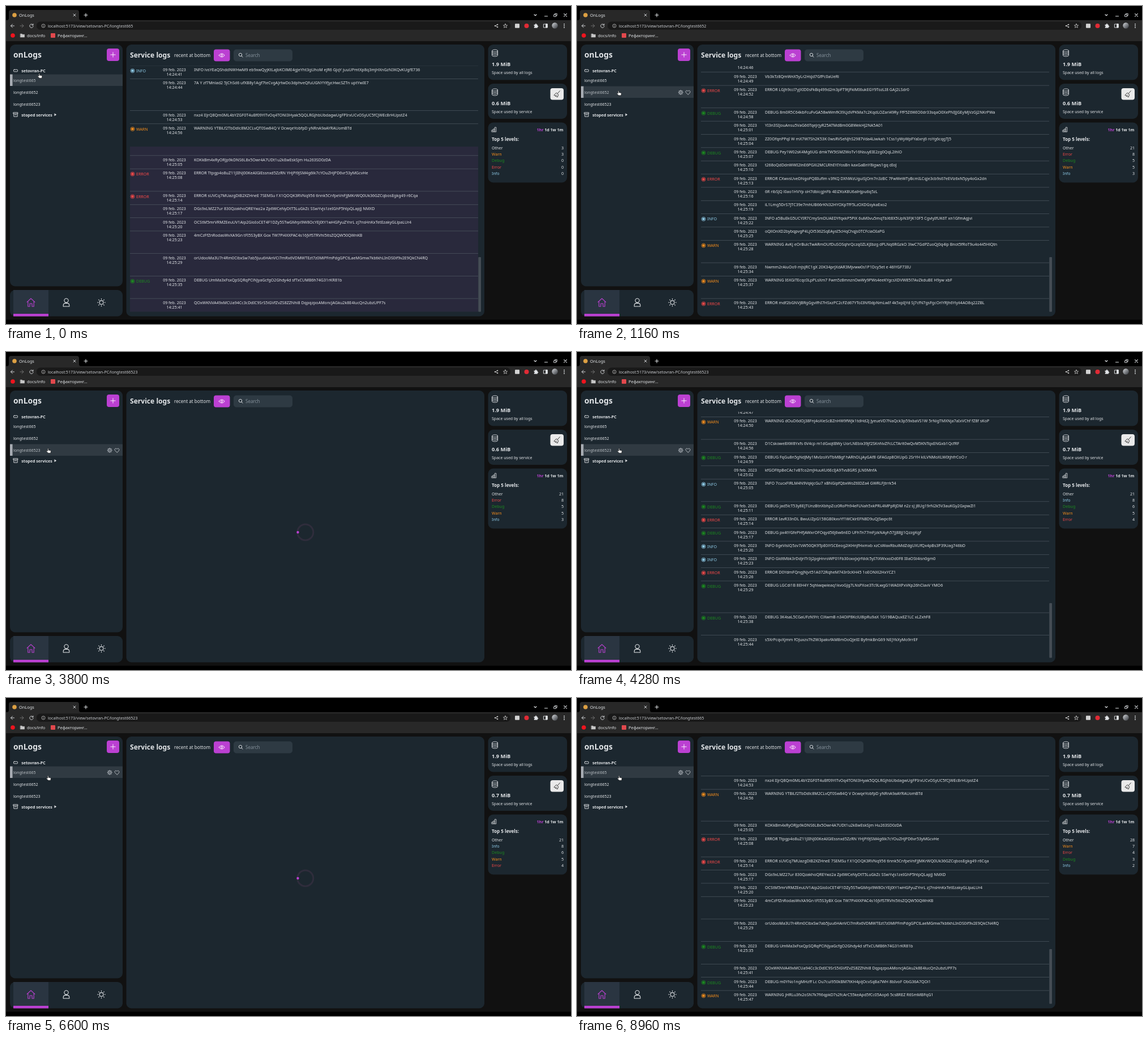
These frames come from a looping animation (998x561 px, 9480 ms). An HTML page:

```html
<!DOCTYPE html>
<html lang="en">
<head>
<meta charset="utf-8">
<title>Log viewer</title>
<style>
html, body { margin: 0; width: 100%; height: 100%; overflow: hidden; background: #000; }
svg { display: block; width: 998px; height: 561px; font-family: "Noto Sans", "Open Sans", sans-serif; }
</style>
</head>
<body>
<svg viewBox="0 0 998 561">
  <defs>
    <clipPath id="logs"><rect x="213" y="105.5" width="632" height="434.5"/></clipPath>
    <linearGradient id="photo" x2="1" y2="1"><stop stop-color="#d5d8dc"/><stop offset="1" stop-color="#33363b"/></linearGradient>
  </defs>
  <g id="base"></g>
  <g id="live"></g>
</svg>
<script>
const LOOP = 9480, PITCH = 23.35, EXTRA = 16.35, BOTTOM = 539.4;
const HOST = 'setovran-PC';
const SERVICES = ['longtest665', 'longtest6652', 'longtest66523'];
const INK = '#e2e5e8', PANEL = '#1c272f', PURPLE = '#bb40d2';
const LEVELS = { INFO: '#8ecae6', WARN: '#f28c1c', ERROR: '#f14848', DEBUG: '#1c8a1f', OTHER: INK };

// Each line: time, number of blank lines after it, message
const parse = s => s.trim().split('\n').map(line => {
  const [time, extra, ...words] = line.split(' ');
  const level = words[0] === 'WARNING' ? 'WARN' : words[0];
  return { time: '14:' + time, h: PITCH + EXTRA * extra, msg: words.join(' '), level: LEVELS[level] && level };
});

const LOGS = [`
24:41 0 INFO ivsYEaQShddNWHwM9 eb9xwQyjKtLajbKCilME4gJeYht3gUhoM ejR6 GjqY juuUPmtXp8q3mjHXnGzN3KQvKUgfE736
24:44 2 7A Y zf7Mnlad2 5JChSd6 ufXB8y1Agf7teCvgAJrtwDo3dphveQfuUGNYYifjycHwcSZTn uptYwIE7
24:53 0 nxz4 IIjrQ8Qm0ML4bYZGF0T4uBf09YlTvOq4TONl3Hyak5QQLRGjhbUbdagwUgFPIrxUCvOSyUC5fCJWEc8rHUpstZ4
24:56 2 WARNING YTBiLf2TbDdlc8M2CLvQT0Sw84Q V DcwqeYobfpD yNRnA9aAYRAUomBTd
25:05 0 KOKkBm4xRyORJp9kDNS6L8x5Owr4A7UDt1u2kEwEskSjm Hu263SD0zDA
25:08 1 ERROR Ttpgp4o8uZ11JIINJ00KeAIGlEssnxd5ZzRN YHjPi9JSM4g6lk7cYOuZHjPD6vr53yMGcvHe
25:14 0 ERROR sUVCq7MUazgDiB2XZHneE 7SEMSu f X1QOQK3RVNq956 tlnnk5CnfpeVnFJJMKrWQ0Uk36GZCqbosEgkg49 r6Cqa
25:17 0 DGs9xLMZ27ur 830QzakhoQREYwz2a Zp6WCeNyDtT5LuGkZc SSwYvjs1zeIGhP5htpQLapJJ NMXD
25:20 0 OCStM5mrVRMZEeuUV1Aip2GioIoCET4F1DZy5STwGMrpi9W8OcYEj0tY1wHGFyuZYnrL zj7nsHnKxTetEzakyGLlpaLUr4
25:23 1 4mCzFfZnRodasWvXA9Gn tFI5S3yBX Gox TW7Pi4XXPAC4s16JVfSTRVhi5itsZQQW50QWnKB
25:29 1 orUdooMa3U7r4Rm0CibxSw7ab5Juu6HAnVCi7mRx6VDMWTEzt7z0MiPFmPdgGPCtLaeMGmw7kbtkhLInDS0if9v2E9QkCN4RQ
25:35 1 DEBUG UmMa3xFsxQpSQRqPCiNJyaGcfgO2Ghdy4d sfTxCUMB6h74G31rKR81b
25:41 0 QOxWKNVA49xMCUa94Cc3cDdIC9SrS5iGVfZvZS8ZZNhi8 DqpqzpoAMoncJAGku2k8E4lucQn2ubzUPF7s
25:44 0 DEBUG m0YNo1ngMHzff Lc Ou7cul950kBM7tKH4pijOcvSqBa7WH 8bIvoF ObG36A7QOi1
25:47 0 WARNING jHRLu3fx2oSN7k7fi6qpkD7s2fcArC55keApd5fCc05Aop6 5cs8REZ R6SmMBFqG1`, `
24:46 0 q7RtLm2VxB0sKe9WdYhN4uPzJc
24:49 0 Vb3kTz8QmWnX5yLr2HsJd7GfPc0aUeRi
24:52 1 ERROR LGJh9ccl7yjXID0sFkBq499d2m3pFT9tJFkiMI6ukEGY9TozLI8 GAJ2LSdr0
24:58 0 DEBUG 8m0R5C64kbFcuFvGA58wWmfK39LJdVPKMa7c2KqdLOZarl49Ry FfF5Z6WIO0dr33sqaO0XePNIJJGEyMjVzGJ2NKrPWa
25:01 0 YI3n3SIJouAnsu5VaG66TqeJrjyR25ATMdBm0G8WekHJ2NA5A01
25:04 0 ZZ0OfqnPPqI W mX7W7Sh2K53K 0wsRVSeNJhS2987Vda4Liwkah 1Css1yWyWpFYaIxnj6 roYg6cqgTJ5
25:07 0 DEBUG Pey1W02sK4Mg6UG dmkTW5tSMZWoTv16NsuyEIE2zg0QqL2ihlO
25:10 0 t268oQdDdnWWI2lnE6PGXi2MCLRhEYIYosBn kaxGaBnY8igws1gq dIoJ
25:13 0 ERROR CXwvsUveDNgoPQBIuflm v3fKQ DXNWzUguiSjOm7n3zBC 7FwWeWTyBcmILCqJe3cb9s67eEVlz6xN5py4oGx2dn
25:16 0 6R ribSJQ l0ao1HVYp oH7dbicgJnFb 4EiZKsK8U6alHjpu6q5zL
25:19 0 iL1Lmg5DrS7JTC39e7mhUB66rKN32HYOXpTfF5LzOXDGsykaExo2
25:22 0 INFO a5BuEkG5UCYIR7CmySmDUAEDYfqxkP5PiX 6uM0vu5mqTbXt8X5UpN3FJK10F5 CgvlyIfUK6T xn1GfmAgjvi
25:25 0 oQllOnXD2bybqpvgP4LjOl5362SqEAysI5cHqChqjs0TCFciaOIaPG
25:28 1 WARNING AvKj eOrBulcTwARmOUfDuSOSqhrQczq0ZLKJIbzg dPLNq6RGzkO 3lwC7GdPZuoQj0q4lp Bnot5fRoT9u4o445HlQtn
25:34 0 Nwmm2rAiuOo9 mJsjRC1gX 20K34prjXdAR3Mjvww0s1P1Dcy5et e 46lYGF73IU
25:37 1 WARNING I6XGiTEcqc0LpPLsXm7 Fwm5z8mnznOwWy9PWs4eeKYgcsXDVW85l7AvZkduBE H9yw xbF
25:43 0 ERROR mdf2bGNVjBRgGgvlfhI7HSxzPC2cFZd67YToI3Nf0dpNmLwIf 4k5xpIjYd Sj7cfN7gsFgcOrlYRJh6Yiyii4AO8q22ZBL
25:46 0 ERROR bnDIHkyZVxtZQjNdBAD6XtOd6ZDmDKYgF7 yGT0ZETW1DKE7Hk0u QmLr`, `
24:47 0 Hn4sXq9TzVw2LcKb7JmRf
24:50 1 WARNING dOuD6dOj38Fnj4oXieScBZnHW9fWJk1tdHd2j JyeueVD7NaQck3p59xbaVS1W 5rNigTMXNja7aIxVChf fZ8f sKoP
24:56 0 D1Cskowe8XW8Yxfs 6V4cp m1dGxqtBWy UorLNEbix39jf2SKnNvZFcLCTArit0wQvM5KNTqxENGxb1QcfRF
24:59 0 DEBUG FqGu8n5gNdJMy1MvIzoXVTbMBgf hARhOLjAyGAf8 GFAGzp8OXUpG 2SrYH klLVNMoXLW0tjhfrCoO r
25:02 0 kfGOFltpBeCAc1vBTco2mJHuuKU6EcIJA9Tvs8GRS JLN0MnfA
25:05 1 INFO 7cucxFlRLM4N9VqkjcGu7 xBNGipfQbxWoZ6IDZa4 GWRLFjtrrk54
25:11 0 DEBUG jad5lcT53y8EJTUnzBtnXbhpZcz0RoPh94eFLNah5xkPRL4MPpRjDM n2z sJ J8Ug19rN2k5V3auKGy2GxpwZl1
25:14 0 ERROR IavR33nDL BwuUZpG158GB0kxvYf1WCklrEFN8D9uQJSwpc6t
25:17 0 DEBUG px4tYGfePHfJAWxrOFOqyd56J6w6nED UFhTn77mFjzkNAyh57JJ88jJ1QzzgKgf
25:20 0 INFO 6geVislQ5zv7zW50QK9TpE0iYSCEeog2iKHnJfHxmxb xzCsWaxRbuiMdZdgUXUfQx4pBs3P39Uag746bD
25:23 0 INFO GldtMbk3rDdJriTr3j2pgHnroWP01Fb30oxxJxJrfddc5yI7iXWxxoDd0F8 IIlaOSt4isn0gm0
25:26 0 ERROR D0YdmFQngJNjvt51A072RqheM743r0cKH45 1oEONXl2HxYCZ1
25:29 2 DEBUG LGCdi1B 8EH4Y 5qhlwqwieaq1kvoGJg7LNsPXoe3Tc9LwgG1WA0XPxVKp26hClavV YMO6
25:38 1 DEBUG 3K4saL5CGaUFzN9Yc CiXwmB n34OlP8KclU8lpRu9aX 1G19BAQuxEZ1LC xLZxhF8
25:44 1 s5XrPcqvXjmm fOJuxzv7hZW3pakvfAM8mOoQJelII ByfmkBnG69 NEJYkXyMo9rrEF`].map(parse);

const STATS = [
  'Other 3 Warn 3 Debug 0 Error 0 Info 0',
  'Other 21 Error 8 Debug 5 Warn 5 Info 3',
  'Other 21 Info 8 Debug 6 Warn 5 Error 4',
  'Other 28 Warn 7 Error 4 Debug 3 Info 2'];

// time, selected service, service in the address, log list (-1: loading), rows not yet arrived, stats, MiB
const STATES = [
  [0, 0, 0, 0, 2, 0, 0.6], [1120, 1, 1, -1, 0, 0, 0.6], [1160, 1, 1, 1, 1, 1, 0.6],
  [2520, 1, 1, 1, 0, 1, 0.6], [3800, 2, 2, -1, 0, 1, 0.6], [4280, 2, 2, 2, 0, 2, 0.7],
  [6560, 0, 2, -1, 0, 2, 0.7], [7000, 0, 0, 0, 0, 3, 0.7]];

// time, x, y of the pointer
const POINTER = [
  [0, 55.5, 118.5], [40, 58, 124], [80, 62, 132], [120, 66, 140], [160, 69, 147], [200, 70, 149],
  [2920, 70.5, 159], [3000, 71, 169.5], [5760, 71, 163.5], [6040, 71, 148], [6160, 71, 136.5],
  [7800, -99, -99], [8120, 71, 136.5]];

const at = (list, t) => list.filter(k => k[0] <= t).pop();
const text = (x, y, s, size = 7.1, fill = INK, more = '') =>
  `<text x="${x}" y="${(y + size * .36).toFixed(2)}" font-size="${size}" fill="${fill}" ${more}>${s}</text>`;
const bold = (x, y, s, size, fill) => text(x, y, s, size, fill, 'font-weight="700"');
const box = (x, y, x2, y2, fill, r = 0) =>
  `<rect x="${x}" y="${y}" width="${x2 - x}" height="${y2 - y}" rx="${r}" fill="${fill}"/>`;
const disc = (x, y, r, fill) => `<circle cx="${x}" cy="${y}" r="${r}" fill="${fill}"/>`;
const ring = (x, y, r, color = INK, w = .9) =>
  `<circle cx="${x}" cy="${y}" r="${r}" fill="none" stroke="${color}" stroke-width="${w}"/>`;
// Line icon, drawn around its centre
const icon = (x, y, d, color = INK, w = .9, fill = 'none') =>
  `<path transform="translate(${x} ${y})" d="${d}" fill="${fill}" stroke="${color}" stroke-width="${w}" stroke-linecap="round" stroke-linejoin="round"/>`;
const rays = (n, a, b) => Array.from({ length: n }, (_, i) => {
  const c = Math.cos(i * 2 * Math.PI / n), s = Math.sin(i * 2 * Math.PI / n);
  return `M${c * a} ${s * a}L${c * b} ${s * b}`;
}).join('');

const CROSS = 'M-2-2L2 2M2-2L-2 2', PLUS = 'M-3 0H3M0-3V3';
const DATABASE = 'M-5-4C-5-6.6 5-6.6 5-4S-5-1.4-5-4V4C-5 6.6 5 6.6 5 4V-4M-5-1.3C-5 1.3 5 1.3 5-1.3M-5 1.4C-5 4 5 4 5 1.4';
const HEART = 'M0 3.6L-3.6 0C-5.2-2.4-1.8-5 0-2.2C1.8-5 5.2-2.4 3.6 0Z';
const HAND = 'M2.6 5V1.3C2.6.2 4 .2 4 1.3V3.7L7.3 4.2Q8.4 4.4 8.3 5.5L7.8 8.8H3.6L.8 6C.2 5 1.4 4.3 2 4.8Z';

function browser() {
  return box(0, 25, 998, 62, '#282828') + box(0, 62, 998, 553.5, '#111') +
    `<path d="M2 25Q5 25 5 21V11Q5 7 9 7H125Q129 7 129 11V21Q129 25 132 25Z" fill="#282828"/>` +
    disc(15, 16, 3.8, '#dda043') + text(23, 16, 'OnLogs', 7.4) + icon(121, 16, CROSS) +
    icon(11.5, 35, 'M3 0H-3M0-3L-3 0L0 3') + icon(28, 35, 'M-3 0H3M0-3L3 0L0 3', '#777') +
    icon(45, 35, 'M2.6-1.8A3.2 3.2 0 1 0 3.2 .6M3-3.4V-1.2H.8') +
    box(54, 27.5, 891, 42, '#191919', 7) + ring(66, 35, 3.1, '#bbb', .8) + icon(66, 35, 'M0-.2V1.6M0-1.6V-1.5', '#bbb', .8) +
    icon(866, 35, 'M2.2-2.2L-2.2 0L2.2 2.2', '#ccc') +
    [[868.2, 32.8], [863.8, 35], [868.2, 37.2]].map(p => disc(...p, 1.1, '#ccc')).join('') +
    icon(882, 35, 'M0-3.6L1 -1.1L3.6-1L1.6.7L2.3 3.3L0 1.8L-2.3 3.3L-1.6.7L-3.6-1L-1-1.1Z', '#ccc', .8) +
    box(899, 31.3, 907, 38.7, '#d3d3d3', 1) + disc(919.5, 35, 4, '#e02b35') +
    icon(936, 35, 'M-3-2H-1C-1.4-4.3 1.4-4.3 1-2H2.6V0C4.6 0 4.6 2 2.6 2V3.4H-3V1.7C-1.4 1.7-1.4-.3-3-.3Z', INK, .4, INK) +
    icon(953, 35, 'M-3.2-3H3.2V3H-3.2ZM.6-3V3H3.2V-3Z') + box(953.8, 32, 956.2, 38, INK) +
    disc(969.5, 34.5, 5.2, 'url(#photo)') + [32, 35, 38].map(y => disc(986, y, .9, INK)).join('') +
    disc(12, 52, 3.8, '#f0141e') + icon(29, 52, 'M-3.5-2.8H-.8L.2-1.7H3.6V3H-3.5Z', '#c8c8c8', .6, '#c8c8c8') +
    text(37, 52, 'docs/info', 7.4) + box(79, 48, 87, 56, '#e2484d', 1) + text(91, 52, 'Рефакторинг…', 7.4);
}

function page() {
  const panels = [[7, 68, 206, 494.5], [7, 501, 206, 547.5], [212.5, 68, 845, 547.5],
    [851.5, 68, 991, 130.5], [851.5, 137, 991, 199], [851.5, 205.5, 991, 311.5]];
  return panels.map(p => box(...p, PANEL, 9)).join('') +
    bold(13, 86, 'onLogs', 13.9) + box(178, 75, 200, 97, PURPLE, 4) + icon(189, 86, 'M-4.2 0H4.2M0-4.2V4.2', '#fff') +
    icon(17, 114, 'M-2.6-1.8H2.6Q3.5-1.8 3.5-.9V.9Q3.5 1.8 2.6 1.8H-2.6Q-3.5 1.8-3.5.9V-.9Q-3.5-1.8-2.6-1.8Z') +
    bold(27.3, 114.5, HOST, 7.1) +
    icon(17, 191.5, 'M-3.8-3.6H3.8V-1.4H-3.8ZM-3.2-1.4V3.6H3.2V-1.4M-1 .4H1') +
    bold(27.3, 192, 'stoped services', 7.1) + icon(87, 191.7, 'M-1.3-2L2 0L-1.3 2Z', INK, .3, INK) +
    box(13, 501, 75, 543, '#2a3541') + box(13, 543, 75, 547.5, PURPLE) +
    icon(44, 523, 'M-7-.6L0-7L7-.6M-5.2-2V7H-2V2H2V7H5.2V-2', PURPLE, 1.1) +
    icon(106.5, 523, 'M-5.3 7V5.2Q-5.3 1.4-1.5 1.4H1.5Q5.3 1.4 5.3 5.2V7ZM0-7A3.6 3.6 0 0 1 0 .2A3.6 3.6 0 0 1 0-7', INK, 1.1) +
    ring(168.5, 523, 3.4, INK, 1.1) + icon(168.5, 523, rays(8, 5.6, 6.8), INK, 1.1) +
    bold(219, 87, 'Service logs', 12.1) + text(297, 87, 'recent at bottom', 8.1) +
    box(367, 76.5, 395.5, 97.5, PURPLE, 4) + icon(381.2, 87, 'M-5 0Q0-6.4 5 0Q0 6.4-5 0Z', '#fff') + ring(381.2, 87, 1.6, '#fff') +
    box(402, 76.5, 506, 97.5, '#2e3a43', 5) + ring(414, 86, 2.7) + icon(414, 86, 'M2 2L4 4.2') +
    text(423, 87, 'Search', 8.1, '#84909a') +
    icon(863.5, 83, DATABASE) + bold(858, 103, '1.9 MiB', 9.2) + text(858, 117.8, 'Space used by all logs', 7) +
    icon(863.5, 152, DATABASE) + text(858, 186.3, 'Space used by service', 7) +
    box(961.5, 145, 985, 165.5, '#eaeaea', 4) +
    icon(973.3, 155.3, 'M5-5.5L1-1M-.8-2L2.4 1L.8 5.4L-5 2.2ZM-2.4 3.6L-1 1.6', '#222') +
    icon(862, 218, 'M-3.8 1H-1.6V4H-3.8ZM-1.1-1H1.1V4H-1.1ZM1.6-4H3.8V4H1.6Z', INK, .8) +
    bold(937.5, 218.5, `<tspan fill="${PURPLE}">1hr</tspan> 1d 1w 1m`, 7.05) + bold(858, 235, 'Top 5 levels:', 8.05);
}

function logList(rows, tint, tinted) {
  let y = BOTTOM - rows.reduce((sum, r) => sum + r.h, 0), out = '';
  if (tint) out += `<rect x="219" y="${tinted}" width="615" height="${BOTTOM - tinted}" fill="${PURPLE}" opacity="${tint}"/>`;
  for (const r of rows) {
    const mid = y + 7.5;
    out += box(219, y - .3, 834, y + .3, '#56606a') + text(297.5, mid, '09 feb. 2023', 7.1, INK, 'text-anchor="middle"') +
      text(297.5, mid + 8, r.time, 7.1, INK, 'text-anchor="middle"') + text(332, mid, r.msg);
    if (r.level) {
      const c = LEVELS[r.level];
      out += ring(223.5, mid + 1.7, 3.5, c, .8) + disc(223.5, mid + 1.7, 2.3, c) + text(230, mid + 1.8, r.level, 7.1, c);
    }
    y += r.h;
  }
  return `<g clip-path="url(#logs)">${out}</g>` + box(834.3, 443, 839, 539.4, '#454d55', 1);
}

function loader(early) {
  return ring(528.8, 318, 14, '#2f2d3c', 3) + (early
    ? disc(516, 314, 2.2, PURPLE) + box(814, 516.5, 835, 537, '#5a3070', 4) + icon(824.5, 526.7, 'M0-3.5V3.5M-2.5 1L0 3.5L2.5 1', '#9484a0')
    : disc(515.5, 318, 2.2, PURPLE));
}

function sidebar(selected, hover) {
  return SERVICES.map((name, i) => {
    const y = 131 + 21 * i, on = i === selected;
    return (on ? box(7, y - 10.4, 206, y + 10, '#303a42') : '') +
      (on && Math.max(0, hover) === i ? box(7, y - 10.4, 11.5, y + 10, '#a8adb4') : '') +
      text(13, y, name, 7.1, on ? '#b9bfc4' : INK) +
      (hover === i ? ring(183.2, y + .4, 1.5, '#c5cad0', .8) + ring(183.2, y + .4, 3.2, '#c5cad0', .8) +
        icon(183.2, y + .4, rays(8, 3.4, 4), '#c5cad0') + icon(196, y + .6, HEART, '#c5cad0') : '');
  }).join('') + (hover === -1 ? icon(83, 114, 'M-3.6 3.6L-3-.9-.6 3.1ZM-3 1L2-3.8L3.8-2L-1 3Z'.replace('-.9-.6', '1L-1'), INK, .8) : '');
}

function stats(s) {
  const words = s.split(' ');
  return [0, 1, 2, 3, 4].map(i => {
    const name = words[2 * i], y = 250 + 11.45 * i;
    return text(858, y, name, 7.1, LEVELS[name.toUpperCase()]) + text(985, y, words[2 * i + 1], 7.1, INK, 'text-anchor="end"');
  }).join('');
}

function windowButtons(color) {
  return icon(141, 16, PLUS, color, 1.1) + icon(935, 16, 'M-2-1L0 1L2-1', color, 1.1) + icon(954, 18, 'M-2.5 0H2.5', color, 1.2) +
    icon(970.5, 16, 'M-2.5-.8H1V2.7H-2.5ZM-1-.8V-2.7H2.7V1H1', color) + icon(988, 16, 'M-2.4-2.4L2.4 2.4M2.4-2.4L-2.4 2.4', color, 1.1);
}

function scene(t) {
  const [start, selected, address, list, missing, stat, used] = at(STATES, t);
  const [, px, py] = at(POINTER, t);
  const hover = px < 0 ? -9 : Math.floor((py - 120.5) / 21);
  let tint = 0, tinted = 248;
  if (t < 200) tint = .08 * (1 - Math.floor(t / 40) / 5);
  if (t >= 2520 && t < 2640) [tint, tinted] = [.08, BOTTOM - PITCH];
  const rows = list < 0 ? [] : LOGS[list].slice(0, LOGS[list].length - missing);
  return windowButtons(t >= 7800 && t < 8960 ? '#999' : INK) +
    text(74, 35, `localhost:5173/view/${HOST}/${SERVICES[address]}`, 7.1, '#c9ccd0') +
    sidebar(selected, hover) + (list < 0 ? loader(start === 1120) : logList(rows, tint, tinted)) +
    bold(858, 171.5, used + ' MiB', 9.2) + stats(STATS[stat]) + icon(px, py, HAND, '#111', .6, '#fff');
}

const live = document.getElementById('live');
let shown = '';
document.getElementById('base').innerHTML = browser() + page();
function frame() {
  const next = scene(performance.now() % LOOP);
  if (next !== shown) live.innerHTML = shown = next;
  requestAnimationFrame(frame);
}
frame();
</script>
</body>
</html>
```
